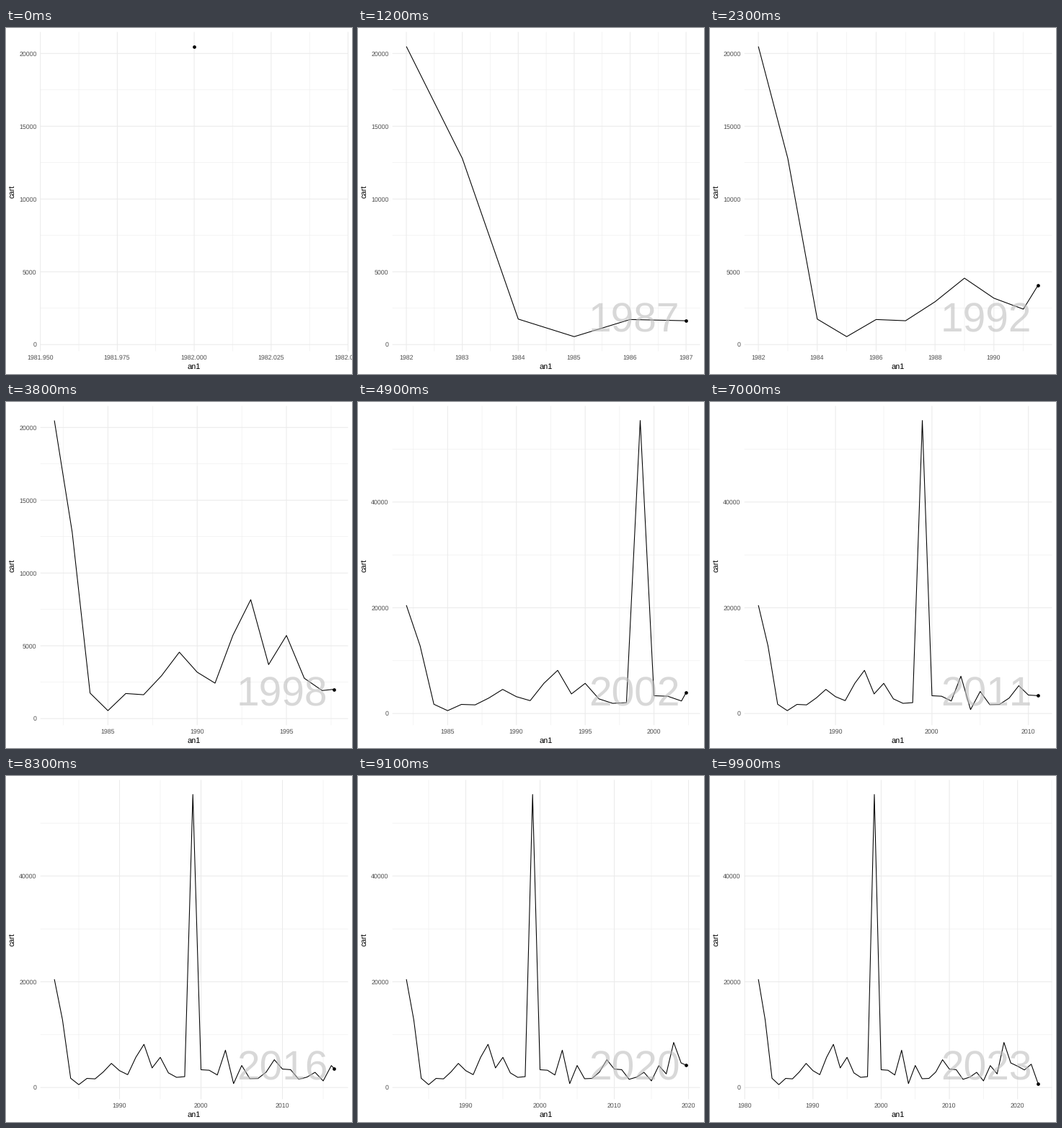
A matplotlib script that plays this animation: 480x480 px, repeating every 10000 ms.

```python
from math import ceil, floor, log10

import matplotlib.pyplot as plt
import numpy as np
from matplotlib.animation import FuncAnimation

plt.rcParams.update({
    "font.family": "Liberation Sans",
    "text.hinting": "no_hinting",
    "text.kerning_factor": 6,
})

SIZE, DPI, FRAMES = 480, 72, 100
LEFT, RIGHT, TOP, BOTTOM = 47.7, 474.5, 5.5, 448.3

values = np.array([
    20480, 12790, 1752, 545, 1722, 1638, 2940, 4562, 3187, 2434,
    5715, 8170, 3706, 5710, 2770, 1925, 2058, 55430, 3366, 3270,
    2372, 7060, 740, 4170, 1663, 1720, 2917, 5260, 3490, 3380,
    1554, 1963, 2876, 1254, 4150, 2580, 8530, 4648, 4034, 3325,
    4416, 760])
years = 1982 + np.arange(len(values))
# Each year lands on a whole frame
keys = np.round((years - years[0]) * (FRAMES - 1) / (len(years) - 1))


def nice_breaks(lo, hi, m=5):
    """Extended Wilkinson labelling: best scoring (first, step, count)."""
    steps = [1, 5, 2, 2.5, 4, 3]
    best, found = -9, None
    for j in (1, 2):
        for i, q in enumerate(steps):
            for k in range(2, 11):
                z0 = ceil(log10((hi - lo) / (k + 1) / j / q))
                for z in (z0, z0 + 1):
                    step = j * q * 10.0 ** z
                    first = (floor(hi / step) - k + 1) * j
                    last = ceil(lo / step) * j
                    for s in range(first, last + 1):
                        a = s * step / j
                        b = a + step * (k - 1)
                        zero = s % j == 0 and a <= 0 <= b
                        simple = 1 - i / (len(steps) - 1) - j + 1 + zero
                        cover = 1 - 0.5 * ((hi - b) ** 2 + (lo - a) ** 2) / (0.1 * (hi - lo)) ** 2
                        ratio = (max(b, hi) - min(a, lo)) / step / (m - 1)
                        dense = 2 - max(ratio, 1 / ratio)
                        score = 0.25 * simple + 0.2 * cover + 0.5 * dense
                        if score > best + 1e-9:
                            best, found = score, (a, step, k)
    return found


def ticks(lo, hi):
    """Major ticks, their labels and the minor ticks inside a range."""
    a, step, k = nice_breaks(lo, hi)
    tol = (hi - lo) * 1e-6
    majors = a + step * np.arange(k)
    minors = a + step * (np.arange(-1, k + 1) + 0.5)
    digits = next(d for d in range(8)
                  if np.allclose(majors, np.round(majors, d), rtol=0, atol=tol))

    def inside(v):
        return v[(v >= lo - tol) & (v <= hi + tol)]

    majors = inside(majors)
    return majors, [f"{v:.{digits}f}" for v in majors], inside(minors)


def expand(lo, hi):
    pad = 0.05 * (hi - lo) or 0.05
    return lo - pad, hi + pad


def scale(lo, hi, start, end):
    return lambda v: start + (np.asarray(v) - lo) / (hi - lo) * (end - start)


fig = plt.figure(figsize=(SIZE / DPI, SIZE / DPI), dpi=DPI, facecolor="white")
ax = fig.add_axes([0, 0, 1, 1])


def grid(xs, ys, width):
    style = dict(color="#EBEBEB", lw=width, snap=False)
    ax.vlines(xs, TOP, BOTTOM, **style)
    ax.hlines(ys, LEFT, RIGHT, **style)


def draw(i):
    ax.clear()
    ax.set(xlim=(0, SIZE), ylim=(SIZE, 0))
    ax.axis("off")

    now = np.interp(i, keys, years)
    level = np.interp(i, keys, values)
    past = keys < i
    xs = np.append(years[past], now)
    ys = np.append(values[past], level)

    xlim = expand(years[0], now)
    ylim = expand(values.min(), ys.max())
    fx = scale(*xlim, LEFT, RIGHT)
    fy = scale(*ylim, BOTTOM, TOP)
    xmaj, xlabels, xmin = ticks(*xlim)
    ymaj, ylabels, ymin = ticks(*ylim)

    grid(fx(xmin), fy(ymin), 0.53)
    grid(fx(xmaj), fy(ymaj), 1.07)

    ax.plot(fx(xs), fy(ys), color="black", lw=1.07, snap=False,
            solid_joinstyle="round", solid_capstyle="butt", zorder=3)
    ax.plot(fx(now), fy(level), "o", color="black", ms=3.9, mew=0.7, zorder=4)
    if i > 0:
        ax.text(320, 421, f"{floor(now + 0.5 + 1e-9)}", size=56.9,
                color="#BEBEBE", alpha=0.6, zorder=5)

    small = dict(size=8.8, color="#4D4D4D")
    for x, label in zip(fx(xmaj), xlabels):
        ax.text(x - 0.4, 459.8, label, ha="center", **small)
    for y, label in zip(fy(ymaj), ylabels):
        ax.text(42.5, y + 3.2, label, ha="right", **small)
    ax.text((LEFT + RIGHT) / 2, 472.7, "an1", size=11, ha="center")
    ax.text(13.6, (TOP + BOTTOM) / 2, "cart", size=11, rotation=90,
            ha="right", va="center")


anim = FuncAnimation(fig, draw, frames=FRAMES, interval=100,
                     init_func=lambda: None, repeat=True, repeat_delay=0)
plt.show()
```
